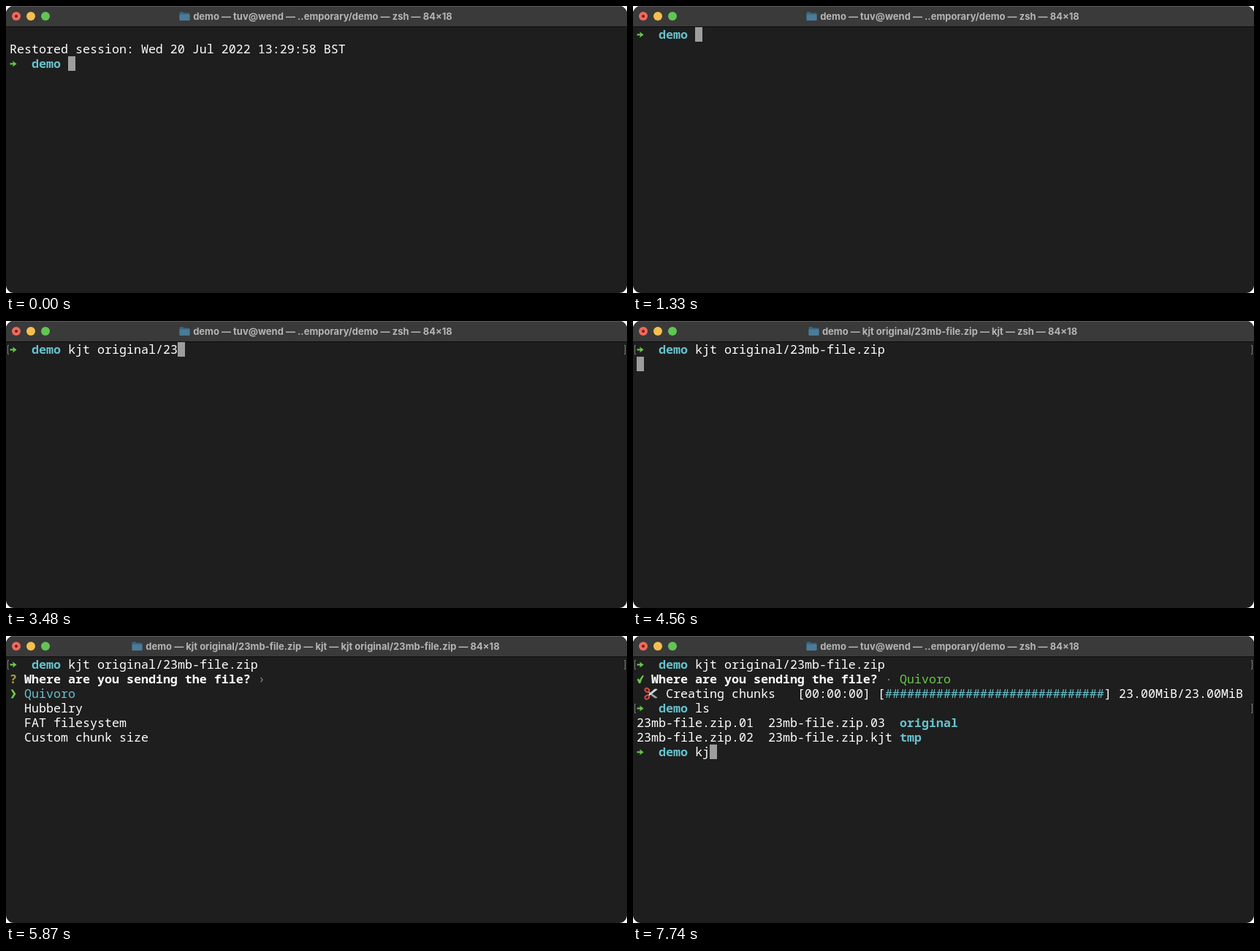
These frames come from a looping animation (850x394 px, 8000 ms). An HTML page:

```html
<!DOCTYPE html>
<html lang="en">
<head>
<meta charset="utf-8">
<title>Terminal demo</title>
<style>
  html, body { margin: 0; width: 100%; height: 100%; overflow: hidden; background: #fff; }
  .window {
    position: relative; width: 850px; height: 394px;
    border-radius: 11px; overflow: hidden; background: #1e1e1e;
  }
  .bar {
    position: absolute; left: 0; top: 0; width: 850px; height: 28px;
    background: #3a3a3a; box-shadow: inset 0 1px #5c5c5c, 0 1px #0b0b0b;
  }
  .title {
    position: absolute; left: 0; top: 0; width: 848px; height: 28px;
    display: flex; align-items: center; justify-content: center; gap: 4px;
    font: 700 13px/28px Inter, "Liberation Sans", sans-serif;
    color: #b5b5b5; white-space: pre;
  }
  svg { display: block; }
  .screen { position: absolute; left: 0; top: 0; }
  .screen text {
    font: 500 16.6667px "Noto Sans Mono", "DejaVu Sans Mono", monospace;
    font-variant-ligatures: none; white-space: pre; fill: #fff;
  }
  .screen .bold { font-weight: 700; }
  .screen .cyan { fill: #66c2cd; }
  .screen .green { fill: #69c749; }
  .screen .yellow { fill: #aaa033; }
  .screen .dim { fill: #858585; }
  .mark { fill: none; stroke: #808080; }
</style>
</head>
<body>
<div class="window">
  <div class="bar">
    <svg width="70" height="28">
      <circle cx="14" cy="14" r="6" fill="#ed6a5e"/>
      <circle cx="14" cy="14" r="2" fill="#7d1a12"/>
      <circle cx="34" cy="14" r="6" fill="#f5bf4f"/>
      <circle cx="54" cy="14" r="6" fill="#61c554"/>
    </svg>
    <div class="title">
      <svg width="15" height="14">
        <path d="M.5 2.5Q.5 1 2 1H5L6.5 2.5H13Q14.5 2.5 14.5 4V11.5Q14.5 13 13 13H2Q.5 13 .5 11.5Z" fill="#396580"/>
        <path d="M.5 4.5H14.5V11.5Q14.5 13 13 13H2Q.5 13 .5 11.5Z" fill="#4a7b97"/>
      </svg>
      <span id="title"></span>
    </div>
  </div>
  <svg class="screen" id="screen" width="850" height="394"></svg>
</div>
<script>
const LOOP = 8000;
const tool = "kjt";
const command = tool + " original/23mb-file.zip";
const places = ["Quivoro", "Hubbelry", "FAT filesystem", "Custom chunk size"];
const question = "Where are you sending the file?";

const idle = "demo — tuv@wend — ..emporary/demo — zsh — 84×18";
const starting = `demo — ${command} — ${tool} — zsh — 84×18`;
const running = `demo — ${command} — ${tool} — ${command} — 84×18`;

// Cells are 10 by 20 pixels; the grid starts at 5,29.
const cellX = col => 5 + col * 10;
const cellY = row => 29 + row * 20;

const text = (col, row, str, cls = "") =>
  `<text x="${cellX(col)}" y="${cellY(row) + 16}" class="${cls}">${str}</text>`;
const icon = (col, row, shapes) =>
  `<g transform="translate(${cellX(col)} ${cellY(row)})">${shapes}</g>`;
const cursor = (col, row) =>
  `<rect x="${cellX(col)}" y="${cellY(row)}" width="10" height="20" fill="#9d9d9d"/>`;
const marks = row => `<path class="mark" transform="translate(0 ${cellY(row)})"
  d="M4 4.5H2.5V16.5H4M846 4.5H847.5V16.5H846"/>`;

const arrow = row => icon(0, row,
  `<path class="green" d="M.5 9.2H5L4 6.2L9.6 10.4L4 14.6L5 11.6H.5Z"/>`);
const pointer = row => icon(0, row,
  `<path class="green" d="M1.5 4.5H4.5L8.5 10.5L4.5 16.5H1.5L5.2 10.5Z"/>`);
const check = row => icon(0, row,
  `<path class="green" d="M.4 11L2.6 9.3L4 11.6Q6 7 8.3 4.8L9.9 5.8Q6.8 10 5.2 16H3Q2 13 .4 11Z"/>`);
const scissors = (col, row) => icon(col, row, `
  <path d="M7 7L18.5 15.5Q16 17.5 13 15L6 9Z" fill="#9ba3a8"/>
  <path d="M7 13.5L18.5 4.5Q16 2.5 13 5L6 11.5Z" fill="#d3d8da"/>
  <g fill="none" stroke="#dc4942" stroke-width="2">
    <ellipse cx="4.3" cy="5.3" rx="3" ry="2.4" transform="rotate(35 4.3 5.3)"/>
    <ellipse cx="4.3" cy="15" rx="3" ry="2.4" transform="rotate(-35 4.3 15)"/>
  </g>`);

const prompt = (row, str = "") => arrow(row) + text(3, row, "demo", "bold cyan") + text(8, row, str);
const typing = (row, str) => prompt(row, str) + cursor(8 + str.length, row);
const entered = (row, str) => marks(row) + prompt(row, str);

const greeting = str =>
  text(0, 1, "Restored session: Wed 20 Jul 2022 13:29:58 BST") + typing(2, str);

const menu = picked => entered(0, command) +
  text(0, 1, "?", "bold yellow") + text(2, 1, question, "bold") + text(34, 1, "›", "dim") +
  pointer(2 + picked) +
  places.map((p, i) => text(2, 2 + i, p, i === picked ? "cyan" : "")).join("");

const chunked = entered(0, command) +
  check(1) + text(2, 1, question, "bold") + text(34, 1, "·", "dim") + text(36, 1, places[0], "green") +
  scissors(1, 2) + text(4, 2, "Creating chunks") + text(22, 2, "[00:00:00] [") +
  text(34, 2, "#".repeat(30), "cyan") + text(64, 2, "] 23.00MiB/23.00MiB");

const listed = chunked + entered(3, "ls") +
  text(0, 4, "23mb-file.zip.01") + text(18, 4, "23mb-file.zip.03") + text(36, 4, "original", "bold cyan") +
  text(0, 5, "23mb-file.zip.02") + text(18, 5, "23mb-file.zip." + tool) + text(36, 5, "tmp", "bold cyan");

const typed = n => typing(0, (command + " ").slice(0, n));

// Start time, screen, window title
const steps = [
  [0, greeting("")],
  [250, greeting("cl")],
  [520, greeting("clea")],
  [790, greeting("clear")],
  [1060, typed(0)],
  [1600, typed(1)],
  [1870, typed(3)],
  [2130, typed(4)],
  [2400, typed(6)],
  [2670, marks(0) + typed(13)],
  [3210, marks(0) + typed(14)],
  [3480, marks(0) + typed(15)],
  [3750, marks(0) + typed(27)],
  [4560, entered(0, command) + cursor(0, 1), starting],
  [4820, menu(0), running],
  [5080, menu(1), running],
  [5340, menu(2), running],
  [5600, menu(1), running],
  [5870, menu(0), running],
  [6140, chunked, running],
  [6400, chunked + typing(3, "")],
  [6940, chunked + typing(3, "l")],
  [7210, chunked + typing(3, "ls")],
  [7470, listed + typing(6, "")],
  [7740, listed + typing(6, tool.slice(0, 2))]
];

const screenEl = document.getElementById("screen");
const titleEl = document.getElementById("title");
let shown = null;

function draw() {
  const now = performance.now() % LOOP;
  const step = steps.findLast(s => s[0] <= now);
  if (step !== shown) {
    shown = step;
    screenEl.innerHTML = step[1];
    titleEl.textContent = step[2] || idle;
  }
  requestAnimationFrame(draw);
}
draw();
</script>
</body>
</html>
```
